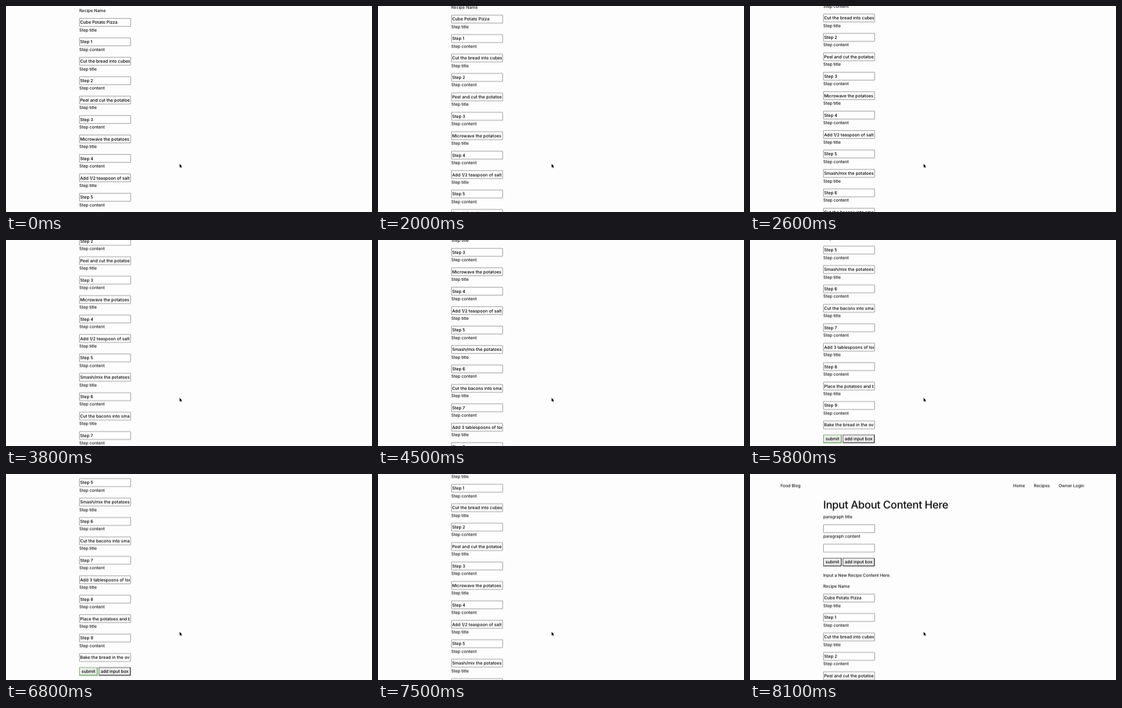
Write an HTML page that moves like this. It is 600 px wide and 338 px high and loops after 9100 ms.

```html
<!DOCTYPE html>
<html lang="en">
<head>
<meta charset="utf-8">
<title>Recipe form</title>
<style>
  html, body { margin: 0; width: 100%; height: 100%; overflow: hidden; background: #fdfdfd; }
  svg { display: block; }
  #stage { width: 100vw; height: 100vh; }
  text {
    font: 500 7px Inter, "Open Sans", sans-serif;
    letter-spacing: -.01em;
    text-rendering: geometricPrecision;
    white-space: pre;
    fill: #181b1e;
  }
  .heading { font-size: 17.5px; letter-spacing: -.02em; fill: #0c0e10; }
  .field { fill: #fff; stroke: #808080; stroke-width: .8; }
  .button { fill: #efefef; stroke: #383838; stroke-width: .8; }
  .shade { fill: none; stroke: #111; stroke-width: .8; }
  .green .button { fill: #ecf0ea; stroke: #5c9c52; }
  .green .shade { stroke: #3c7c35; }
  .field-text { font-size: 7.1px; letter-spacing: -.005em; fill: #000; }
</style>
</head>
<body>
<svg id="stage" viewBox="0 0 600 338">
  <g id="page"></g>
  <path d="M284.6 259v6l1.4-1.2.9 2.2 1-.4-.9-2.1h1.8z"
        fill="#000" stroke="#fff" stroke-width=".5" paint-order="stroke"/>
</svg>
<script>
const LOOP = 9100;
const LEFT = 120;
const FIRST_FIELD = 203.5;
const PITCH = 31.88;
const page = document.getElementById('page');

function add(parent, tag, attrs, content = '') {
  const el = document.createElementNS('http://www.w3.org/2000/svg', tag);
  for (const [key, value] of Object.entries(attrs)) el.setAttribute(key, value);
  el.textContent = content;
  return parent.appendChild(el);
}

const label = (x, y, content, cls = '') => add(page, 'text', { x, y, class: cls }, content);

function field(cy, value = '') {
  add(page, 'rect', { class: 'field', x: LEFT + .45, y: cy - 6.5, width: 83.9, height: 13, rx: .3 });
  const view = add(page, 'svg', { x: LEFT + 1, y: cy - 6, width: 82, height: 12, overflow: 'hidden' });
  add(view, 'text', { class: 'field-text', x: .4, y: 8.6 }, value);
}

function button(parent, x, cy, width, caption) {
  const top = cy - 6.4, bottom = cy + 6.4;
  add(parent, 'rect', { class: 'button', x, y: top, width, height: 12.8 });
  add(parent, 'path', { class: 'shade', d: `M${x} ${bottom}h${width}V${top}` });
  add(parent, 'text', { class: 'field-text', x: x + width / 2, y: cy + 2.5, 'text-anchor': 'middle' }, caption);
}

function buttons(cy, cls) {
  button(add(page, 'g', { class: cls }), LEFT + .45, cy, 29.2, 'submit');
  button(page, LEFT + 32.3, cy, 51.6, 'add input box');
}

label(50, 22, 'Food Blog');
label(431.3, 22, 'Home');
label(465.3, 22, 'Recipes');
label(506, 22, 'Owner Login');
label(LEFT, 56.8, 'Input About Content Here', 'heading');
label(LEFT, 73, 'paragraph title');
field(89.6);
label(LEFT, 104.6, 'paragraph content');
field(121.5);
buttons(144.4, '');
label(LEFT, 168.6, 'Input a New Recipe Content Here:');
label(LEFT, 186.7, 'Recipe Name');

const instructions = [
  'Cut the bread into cubes',
  'Peel and cut the potatoes',
  'Microwave the potatoes',
  'Add 1/2 teaspoon of salt,',
  'Smash/mix the potatoes',
  'Cut the bacons into small',
  'Add 3 tablespoons of tomato',
  'Place the potatoes and bacons',
  'Bake the bread in the oven'
];
let cy = FIRST_FIELD;
field(cy, 'Cube Potato Pizza');
instructions.forEach((instruction, i) => {
  for (const [name, value] of [['Step title', `Step ${i + 1}`], ['Step content', instruction]]) {
    label(LEFT, cy + 14.9, name);
    cy += PITCH;
    field(cy, value);
  }
});
buttons(cy + 22.8, 'green');

// Each run: start time, then the scroll position at every 100 ms.
const runs = [
  [0, 176.6],
  [2000, 182, 198, 216, 231, 241, 246, 247.7],
  [3200, 249, 254, 262, 271, 281, 289.5, 297.1, 304, 309, 313, 315],
  [4500, 342.7, 400, 446, 466],
  [5300, 469.6],
  [5500, 471, 472],
  [5800, 474, 475.5, 476.3],
  [6500, 478, 480, 478, 476.3],
  [7200, 466, 415, 315, 212, 132, 76, 38, 15, 4, 0]
];
const frames = runs.flatMap(([start, ...stops]) => stops.map((scroll, i) => ({
  offset: (start + i * 100) / LOOP,
  transform: `translateY(${-scroll}px)`,
  easing: 'step-end'
})));
frames.push({ offset: 1, transform: 'translateY(0px)' });
page.animate(frames, { duration: LOOP, iterations: Infinity });
</script>
</body>
</html>
```
